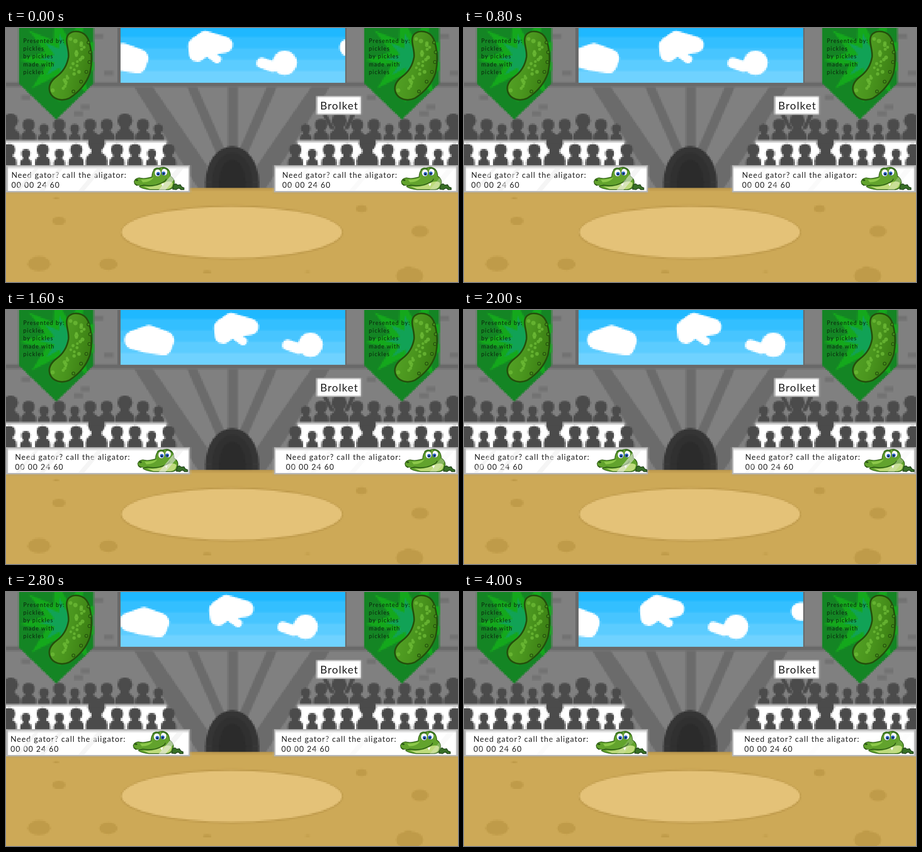
These frames come from a looping animation (998x561 px, 4.2 s). An HTML page with a canvas:

```html
<!DOCTYPE html>
<html lang="en">
<head>
<meta charset="utf-8">
<title>Arena</title>
<style>
  html, body { margin: 0; width: 100%; height: 100%; overflow: hidden; background: #808080; }
  canvas { position: absolute; left: 0; top: 0; width: 998px; height: 563.2px; image-rendering: pixelated; }
  svg { position: absolute; left: 0; top: 0; width: 998px; height: 561px; }
  text { font-family: Lato, "Open Sans", sans-serif; fill: #1c1c1c; }
  .ad text { font-size: 17px; letter-spacing: 1.38px; }
  .banner text { font-size: 12.5px; letter-spacing: 1.3px; font-weight: 500; fill: #08230b; opacity: .9; }
  .fan { font-size: 23.5px; letter-spacing: 1.5px; }
</style>
</head>
<body>
<canvas id="scene" width="280" height="158"></canvas>
<svg viewBox="0 0 998 561">
  <defs>
    <linearGradient id="skin" x1="0" x2="1" y1="0" y2=".35">
      <stop offset="0" stop-color="#58a828"/><stop offset=".6" stop-color="#4a951e"/><stop offset="1" stop-color="#3c8014"/>
    </linearGradient>
    <g id="pickle">
      <path d="M139 13C149 4 172 5 181 24C190 46 191 78 185 100C177 124 160 142 140 155C122 163 103 157 97 142C92 127 100 116 112 107C127 96 135 82 138 64C140 46 127 25 139 13Z"
        fill="url(#skin)" stroke="#24500c" stroke-width="3.5"/>
      <g id="bumps"></g>
    </g>
    <g id="gator">
      <path d="M322 329Q323 310 336 310Q349 304 358 312Q363 318 363 327Q374 334 371 346Q369 357 355 357L318 357Q302 356 294 350Q283 347 283 339Q285 332 294 331Q306 334 322 329Z" fill="#62a32d" stroke="#2f5f17" stroke-width="1.5"/>
      <path d="M298 335Q314 335 326 330Q320 340 302 341Z" fill="#8cc84a"/>
      <path d="M304 350Q330 353 346 342Q362 336 368 342Q368 354 356 356L318 356Z" fill="#bedb7c"/>
      <path d="M284 344Q294 351 304 347Q328 351 346 341Q353 338 354 333" fill="none" stroke="#2d5a16" stroke-width="2"/>
      <path d="M289 348l3 5 3-5zM343 344l3 6 3-7z" fill="#fff"/>
      <ellipse cx="289" cy="336" rx="3" ry="2" fill="#2d5a16"/>
      <g fill="#fff" stroke="#476c32" stroke-width=".8">
        <ellipse cx="335" cy="320" rx="7" ry="8"/><ellipse cx="350" cy="318" rx="6.5" ry="8"/>
      </g>
      <g fill="#2e67c8"><circle cx="336" cy="322" r="4"/><circle cx="348" cy="321" r="4"/></g>
      <g fill="#10203c"><circle cx="336" cy="323" r="2"/><circle cx="348" cy="322" r="2"/></g>
      <path d="M326 314Q333 307 341 312M345 310Q353 308 358 315" fill="none" stroke="#3a7420" stroke-width="3"/>
      <path d="M368 356L370 346L375 344L379 347L385 346L388 351L393 353L393 357L386 357Q382 351 376 357Z" fill="#386f27" stroke="#20421a" stroke-width="1.5"/>
    </g>
  </defs>
  <g id="banners"></g>
  <text class="fan" x="736" y="180" text-anchor="middle">Brolket</text>
  <g id="ads"></g>
  <g id="glare"></g>
</svg>
<script>
const WIDTH = 998, BLOCK = WIDTH / 280, STEP = 200, STEPS = 21;
const CROWD = '#4b4b4b';

// Key poses: [step, value]. Clouds glide between them, ads jump.
const CLOUD_KEYS = [[0, 0], [1, 3], [2, 3], [6, 13], [10, 19], [14, 13], [18, 3], [20, -4]];
const AD_KEYS = [[0, 13], [3, 17], [5, 11], [7, 21], [9, 24], [12, 17], [14, 11], [17, 22]];

// Clouds are thick round strokes: [width, path].
const CLOUDS = [
  [40, 'M292 66L326 53L362 67L357 80L318 74Z'],
  [37, 'M488 39L508 25L550 37L510 42L490 56Z'],
  [18, 'M510 52L534 69'],
  [54, 'M683 77h.1'],
  [24, 'M633 77L656 85L675 82'],
  [40, 'M824 43h30']
].map(([width, d]) => [width, new Path2D(d)]);

const BRICKS = [[195, 13], [217, 94], [34, 148], [165, 169], [150, 184]];
const BIG_SPOTS = [[73, 521, 25], [226, 522, 20], [117, 426, 14], [785, 399, 12], [914, 449, 19], [891, 548, 30]];
const HEADS = { S: 10, M: 13.3, L: 16.5, X: 19 };

const ctx = document.getElementById('scene').getContext('2d');
ctx.scale(1 / BLOCK, 1 / BLOCK);
ctx.lineCap = ctx.lineJoin = 'round';

function random(seed) {
  const s = Math.sin(seed * 91.7) * 43758.5;
  return s - Math.floor(s);
}
function glide(keys, step) {
  const next = keys.findIndex(([at]) => at >= step);
  if (next < 1) return keys[0][1];
  const [[a, from], [b, to]] = keys.slice(next - 1, next + 1);
  return from + (to - from) * (step - a) / (b - a);
}
function hold(keys, step) { return keys.filter(([at]) => at <= step).pop()[1]; }

function box(color, x, y, w, h) { ctx.fillStyle = color; ctx.fillRect(x, y, w, h); }
function tracePoly(points) {
  ctx.beginPath();
  points.forEach(p => ctx.lineTo(...p));
  ctx.closePath();
}
function poly(color, points) { tracePoly(points); ctx.fillStyle = color; ctx.fill(); }
function oval(color, x, y, rx, ry = rx) {
  ctx.beginPath();
  ctx.ellipse(x, y, rx, ry, 0, 0, 7);
  ctx.fillStyle = color;
  ctx.fill();
}
function bothSides(draw) {
  draw();
  ctx.save();
  ctx.translate(WIDTH, 0);
  ctx.scale(-1, 1);
  draw();
  ctx.restore();
}

function drawSky(offset) {
  ctx.save();
  ctx.beginPath();
  ctx.rect(71 * BLOCK, 0, 139 * BLOCK, 34 * BLOCK);
  ctx.clip();
  for (let i = 0; i < 5; i++) box(`rgb(${31 + 20 * i},${184 + 6.5 * i},255)`, 250, i && i * 25 - 5, 502, 30);
  ctx.translate((offset - 19) * BLOCK, 0);
  ctx.strokeStyle = '#fff';
  CLOUDS.forEach(([width, path]) => { ctx.lineWidth = width; ctx.stroke(path); });
  ctx.restore();
}

function drawWalls() {
  box('#808080', 0, 0, WIDTH, 356);
  BRICKS.forEach(([x, y]) => [x, x + 763].forEach(left => box('#727272', left, y, 20, 11)));
  box('#696969', 0, 120, WIDTH, 10);
  bothSides(() => {
    box('#696969', 246, 0, 8, 122);
    poly('#6b6b6b', [[283, 130], [324, 130], [444, 304], [444, 354], [424, 354]]);
    poly('#6b6b6b', [[400, 130], [422, 130], [482, 266], [464, 276]]);
  });
  box('#6b6b6b', 490, 130, 22, 140);
}

function drawDoor() {
  for (let i = 0; i < 3; i++) {
    const shade = 53 - 5 * i, rx = 59 - 15 * i;
    ctx.beginPath();
    ctx.ellipse(499.5, 340, rx, 79 - 15 * i, 0, Math.PI, 0);
    ctx.fillStyle = `rgb(${shade},${shade},${shade})`;
    ctx.fill();
    ctx.fillRect(499.5 - rx, 339, rx * 2, 16);
  }
}

function drawBanner(x) {
  ctx.save();
  ctx.translate(x, 0);
  tracePoly([[28, 0], [194, 0], [194, 122], [111, 202], [28, 122]]);
  ctx.fillStyle = '#148524';
  ctx.fill();
  ctx.clip();
  const burst = (color, outer, inner) => poly(color, Array.from({ length: 18 }, (_, i) => {
    const a = i * Math.PI / 9 + .3, r = i % 2 ? inner : outer;
    return [130 + r * Math.cos(a), 66 + r * Math.sin(a)];
  }));
  burst('#14a81c', 100, 46);
  burst('#11a256', 56, 24);
  ctx.restore();
}

function person(x, r, base) {
  const top = base - r * 3.65, shoulder = top + r * 2.1;
  oval(CROWD, x, top + r, r);
  box(CROWD, x - r * .6, top + r, r * 1.2, r * 1.6);
  ctx.beginPath();
  ctx.roundRect(x - r * 1.25, shoulder, r * 2.5, base - shoulder, [r, r, 0, 0]);
  ctx.fill();
}

// Neighbours stand apart by a gap plus most of both head radii.
function crowdRow(sizes, x, base, gap) {
  let last = null;
  for (const size of sizes) {
    const r = HEADS[size];
    if (last) x += gap + .9 * (last + r);
    person(x, r, base);
    last = r;
  }
}

function drawStands() {
  bothSides(() => {
    crowdRow('LMSMSMMLMS', 10, 249, 13);
    box('#fff', 0, 250, 354, 55);
    box('#b9b9b9', 0, 248, 354, 4);
    crowdRow('MSMSMXMMSM', 7, 304, 16);
    box('#b5b5b5', 0, 303, 407, 61);
    box('#fff', 4, 308, 399, 52);
  });
  [[704, 721], [766, 751]].forEach(([hand, elbow]) =>
    poly(CROWD, [[hand - 5, 192], [hand + 5, 192], [elbow + 5, 224], [elbow - 5, 224]]));
  box('#a5a5a5', 685, 150, 100, 42);
  box('#fff', 687, 152, 96, 38);
}

function drawGround() {
  box('#cda957', 0, 354, WIDTH, 210);
  box('#b9964a', 405, 354, 188, 4);
  bothSides(() => box('#bd9a4c', 0, 361, 407, 4));
  BIG_SPOTS.forEach(([x, y, r]) => oval('#bf9b49', x, y, r, r * .66));
  for (let i = 1; i < 9; i++) {
    const r = 4 + 7 * random(i + 20);
    oval('#bf9b49', i * 111, i % 2 ? 375 + 80 * random(i) : 522 + 25 * random(i), r, r * .35);
  }
  oval('#c09c4d', 498.5, 451.5, 246, 60.5);
  oval('#e4c278', 498.5, 451, 243.5, 56.5);
}

function drawScene(cloudOffset) {
  drawWalls();
  drawSky(cloudOffset);
  drawDoor();
  drawGround();
  drawStands();
  [0, 763].forEach(drawBanner);
}

const byId = id => document.getElementById(id);

// Pale warts follow the bend of the pickle; dark-rimmed ones sit on its right edge.
const bend = u => [158 + 46 * u - 92 * u * u, 22 + 118 * u];
const wart = (x, y, r, style) => `<circle cx="${x}" cy="${y}" r="${r}" ${style}/>`;
byId('bumps').innerHTML = Array.from({ length: 26 }, (_, i) => {
  const [x, y] = bend((i + .5) / 26);
  return wart(x + 30 * (random(i + 1) - .55), y, 2.5 + 2.5 * random(i + 50), 'fill="#6dbb37" opacity=".75"');
}).join('') + Array.from({ length: 6 }, (_, i) => {
  const [x, y] = bend((i + .3) / 6);
  return wart(x + 22, y + 4 + i * 2, 3.2, 'fill="#438c1b" stroke="#24500c" stroke-width="1.5"');
}).join('');

const LINES = ['Presented by:', 'pickles', 'by pickles', 'made with', 'pickles'];
byId('banners').innerHTML = [0, 763].map(x => `<g class="banner" transform="translate(${x})"><use href="#pickle"/>` +
  LINES.map((line, i) => `<text x="38" y="${33 + i * 17.2}">${line}</text>`).join('') + '</g>').join('');

byId('ads').innerHTML = [[0, 0], [598, 590]].map(([textX, gatorX]) => `<g class="ad">
  <text x="${textX - 1}" y="331">Need gator? call the aligator:</text>
  <text x="${textX - 1}" y="353">00 00 24 60</text>
  <use href="#gator" x="${gatorX - 13}"/></g>`).join('');

byId('glare').innerHTML = [0, 598].map(x => '<g fill="#ededed">' + [22, 74, 160, 336].map((left, i) =>
  `<path d="M${x + left} 359h${9 + i * 2}l42-50h${-9 - i * 2}z"/>`).join('') + '</g>').join('');

const ads = [...byId('ads').children], glare = byId('glare').children;
const start = performance.now();
let shown = -1;

function tick() {
  const step = Math.floor((performance.now() - start) / STEP) % STEPS;
  if (step !== shown) {
    shown = step;
    drawScene(Math.round(glide(CLOUD_KEYS, step)));
    ads.forEach(ad => ad.setAttribute('transform', `translate(${hold(AD_KEYS, step)})`));
    const strength = step === STEPS - 1 ? .3 : 1;
    glare[0].setAttribute('opacity', .55 * strength);
    glare[1].setAttribute('opacity', .25 * strength);
  }
  requestAnimationFrame(tick);
}
tick();
</script>
</body>
</html>
```
